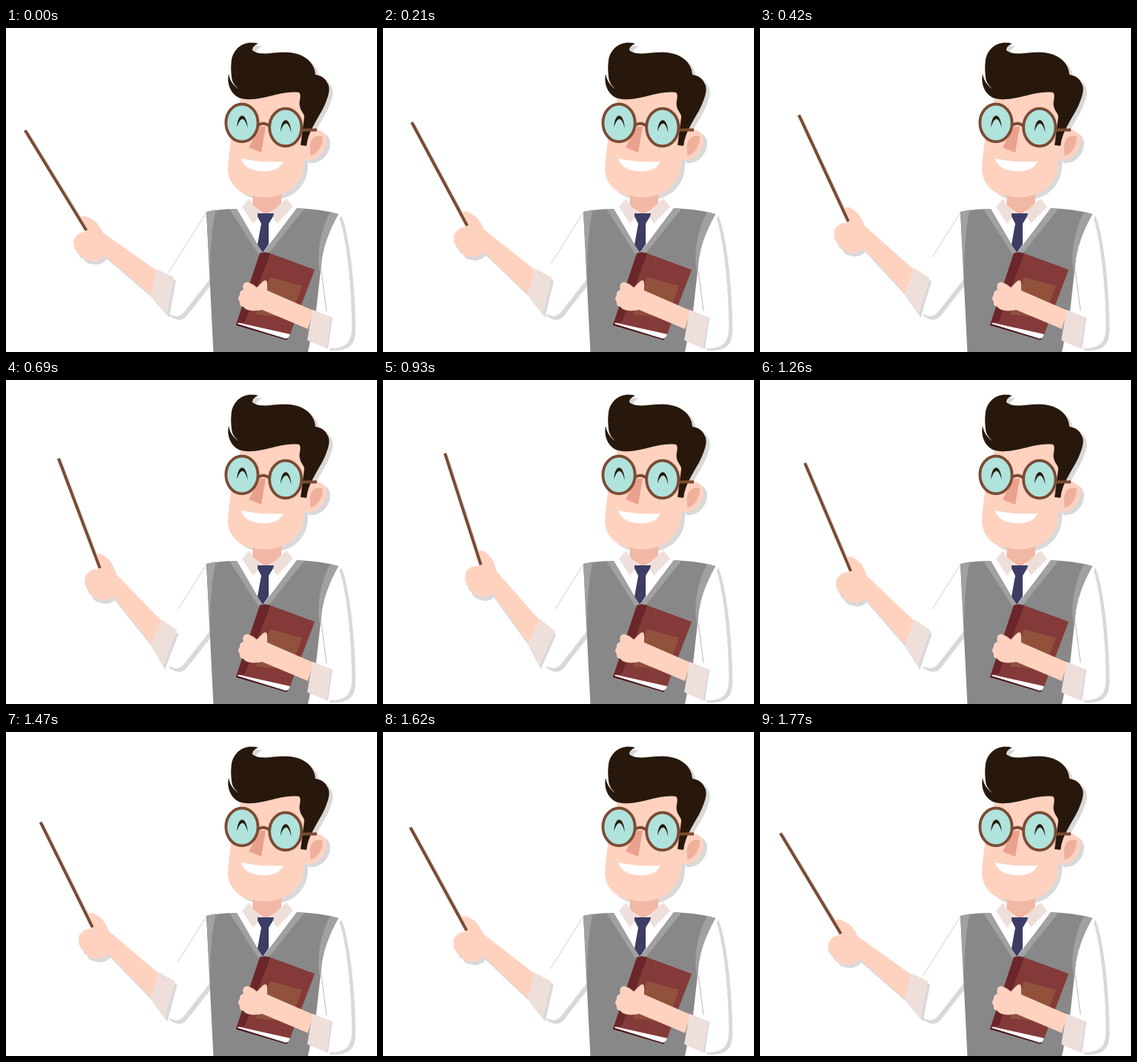
Animation of 500 by 437 pixels, one loop 1800 ms. Source, as an HTML page:

```html
<!DOCTYPE html>
<html lang="en">
<head>
<meta charset="utf-8">
<title>Teacher with a pointer</title>
<style>
html, body { margin: 0; width: 100%; height: 100%; overflow: hidden; background: #fff; }
svg { display: block; width: 100vw; height: 100vh; }
</style>
</head>
<body>
<svg id="stage" viewBox="0 0 500 437"></svg>
<script>
const LOOP = 1800, STEP = 30, SWING = 14.1, ELBOW = '218.5 360';
const SKIN = '#ffd2c0', HAIR = '#27180b', WOOD = '#7b4a33', CUFF = '#efdfda',
      SHADE = '#d9d9d9', VEST = '#888', TRIM = '#a1a1a1', WHITE = '#fff';
const stage = document.getElementById('stage');

function add(parent, tag, attrs = {}) {
  const el = document.createElementNS('http://www.w3.org/2000/svg', tag);
  for (const key in attrs) el.setAttribute(key, attrs[key]);
  return parent.appendChild(el);
}
const fill = (parent, color, d) => add(parent, 'path', { d, fill: color });
const line = (parent, color, width, d) =>
  add(parent, 'path', { d, fill: 'none', stroke: color, 'stroke-width': width });

// Paints the shapes over a grey copy of themselves moved by (dx, dy).
function withShadow(parent, dx, dy, shapes) {
  const shadow = add(parent, 'g', { transform: `translate(${dx} ${dy})` });
  for (const [, d] of shapes) fill(shadow, SHADE, d);
  for (const [color, d] of shapes) fill(parent, color, d);
}

function drawSleeves() {
  withShadow(stage, 4, 5, [
    [WHITE, 'M270 248L219 330L216 383C226 390 233 391 240 383L276 337Z']
  ]);
  withShadow(stage, 5, 3, [
    [WHITE, 'M447 250C457 272 466 343 466 403C466 425 458 433 432 432L415 380L418 300Z']
  ]);
  line(stage, '#888', 0.6, 'M425 328L432 382');
}

function drawTorso() {
  fill(stage, WHITE, 'M309 244L328 231H378L392 243L346 310Z');
  fill(stage, VEST, 'M270 248Q288 244 311 244L346 304L392 243Q424 244 448 251C434 276 427 297 425 318L418 381L407 437H279.5Z');
  fill(stage, TRIM, 'M270 248L283 245Q275 278 275 333Z');
  fill(stage, TRIM, 'M301 244H311L346 304L392 243L402 244L346 314Z');
  fill(stage, TRIM, 'M437 248L448 251C434 276 427 297 425 318L424 332C417 307 424 272 437 248Z');
}

function drawHead() {
  withShadow(stage, 5, 4, [
    [SKIN, 'M402 148C408 134 426 134 431 146C435 158 425 180 403 178Z'],
    [SKIN, 'M318 84V92C307 116 302 154 299 190C299 215 323 230 350 229C379 228 402 211 402 180L406 84Z'],
    [HAIR, 'M340 21C321 16 307 27 304 43C303 51 303 57 304 66L300 62C297 76 304 95 323 96C350 98 369 84 395 87C399 91 394 99 396 106C397 112 402 115 402 120L397 158L405 159C407 139 421 122 429 105C435 91 438 81 433 74C430 67 424 64 417 63C416 46 401 34 381 33C363 31 343 39 332 30C332 25 336 23 340 21Z']
  ]);
  fill(stage, WHITE, 'M300 62C302 72 307 78 313 82C307 77 304 71 304 65Z');
  fill(stage, '#eeb09d', 'M410 166C408 151 415 143 427 146C427 160 419 171 410 172Z');
  fill(stage, '#e9a18d', 'M342 133H350L344 168L327 161Z');
  fill(stage, WHITE, 'M317 176Q344 182 374 180C369 191 357 194 344 193C328 192 320 186 317 176Z');
  for (const [cx, cy] of [[318, 128], [376.7, 134]]) {
    add(stage, 'ellipse', { cx, cy, rx: 21.6, ry: 25.4, fill: '#afe3dc', stroke: WOOD, 'stroke-width': 3.8 });
    const x = cx + 0.3, low = cy + 7;
    fill(stage, HAIR, `M${x - 7} ${low - 1}C${x - 6} ${low - 22} ${x + 6} ${low - 22} ${x + 7.5} ${low}C${x + 3} ${low - 16} ${x - 2} ${low - 16} ${x - 7} ${low - 1}Z`);
  }
  line(stage, WOOD, 4, 'M340 131Q347 126 355 132M399 137.5H419');
}

function drawCollar() {
  fill(stage, '#f1b8a6', 'M333 226Q352 232 371 224V239L350 252L332 239Z');
  fill(stage, CUFF, 'M328 230L318 241L333 264L345 250L332 238Z');
  fill(stage, CUFF, 'M378 230L387 241L365 264L356 250L371 236Z');
  fill(stage, WHITE, 'M333 264L345 250H356L365 264L350 290Z');
  fill(stage, '#3c3c64', 'M339 250H361L360 254L354 264V292L346 303L339 292L344 264L339 254Z');
}

function drawBook() {
  fill(stage, '#4d191c', 'M311 396L310 401L378 421L384 411Z');
  fill(stage, WHITE, 'M313 396L312 399L377 419Q382 418 383 412Z');
  fill(stage, '#843a39', 'M342 304Q347 301 356 304L416 326L383 413L311 397Z');
  fill(stage, '#6a2628', 'M342 304Q348 301 356 304L322 396L311 398Z');
  fill(stage, '#92513b', 'M356 336L399 348L383 391L337 386Z');
}

function drawHoldingHand() {
  fill(stage, SKIN, 'M326 343Q333 345 338 350L346 342Q352 337 352 346V354L414 381L407 406L345 380C333 383 323 381 320 376Q314 375 315 369Q311 366 315 360Q314 355 320 353C318 347 321 342 326 343Z');
  withShadow(stage, 2, 1, [[CUFF, 'M413 380L438 390L432 432L406 421Z']]);
}

function drawPointingArm() {
  const arm = add(stage, 'g');
  line(arm, SHADE, 2.5, 'M29 140L106 265');
  withShadow(arm, 3, 4.5, [
    [SKIN, 'M108 273L99 258C102 252 108 253 114 257C121 260 126 266 129 275L203 327L196 361L133 307C128 313 121 316 114 314C107 314 103 311 102 307Q96 306 96 301Q90 298 92 292Q89 287 94 282Q97 276 106 275Z'],
    [CUFF, 'M203 325L226 336L217 386L195 361Z']
  ]);
  line(arm, WOOD, 4, 'M25.7 138L108.3 273');
  return arm;
}

drawSleeves();
const seam = line(stage, '#aaa', 0.6, '');
drawTorso();
drawHead();
drawCollar();
drawBook();
drawHoldingHand();
const arm = drawPointingArm();

function render(ms) {
  const t = Math.floor((ms % LOOP) / STEP) * STEP;
  const raised = 1 - Math.abs(1 - 2 * t / LOOP);
  arm.setAttribute('transform', `rotate(${raised * SWING} ${ELBOW})`);
  const reach = Math.min(1, raised * 2.5);
  seam.setAttribute('d', `M270 249L${219 + 13 * reach} ${330 - 21 * reach}`);
}

const start = performance.now();
function tick() {
  render(performance.now() - start);
  requestAnimationFrame(tick);
}
tick();
</script>
</body>
</html>
```
